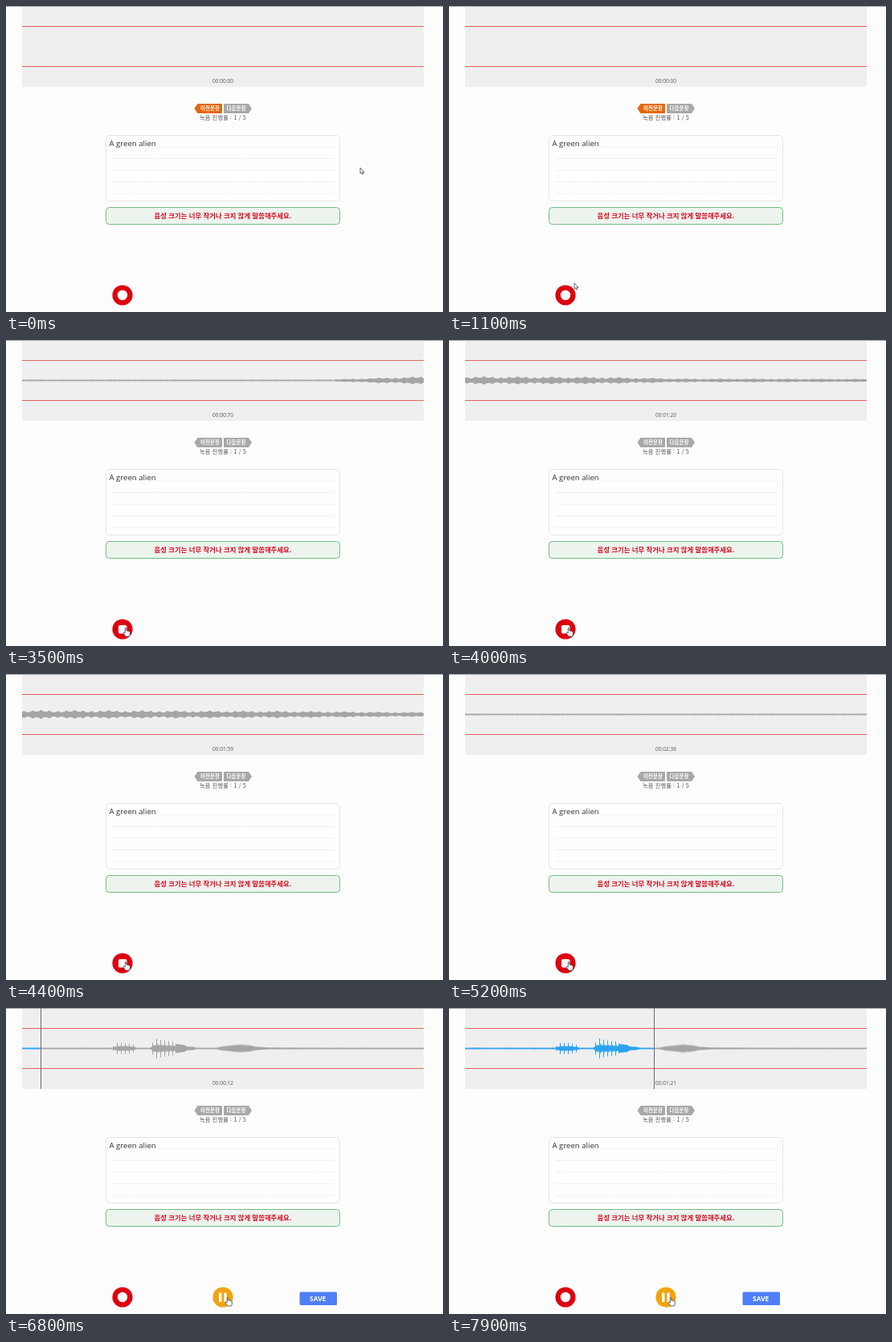
Animation, 544 px wide and 382 px high, one loop 8 s. Source, as an HTML page:

```html
<!DOCTYPE html>
<html lang="ko">
<head>
<meta charset="utf-8">
<title>Recorder</title>
<style>
  html, body { margin: 0; width: 100%; height: 100%; overflow: hidden; background: #fefdfe; }
  svg { display: block; width: 544px; height: 382px; }
  text { font-family: "Open Sans", "Noto Sans CJK KR", "Noto Sans CJK", sans-serif; }
  .ko { font-family: "Noto Sans CJK KR", "Noto Sans CJK", sans-serif; }
  .mid { text-anchor: middle; }
  .bold { font-weight: 700; }
  .white { fill: #fff; }
</style>
</head>
<body>
<svg viewBox="0 0 544 382">
  <rect x="20" width="500" height="101" fill="#f0eff0"/>
  <rect width="544" height="1" fill="#a3a2a4"/>
  <path d="M20 25.5H520M20 75.5H520" stroke="#e4605f"/>
  <path id="rest" stroke="#a6a5a6"/>
  <path id="done" stroke="#2ba4ee"/>
  <path id="head" d="M.5 0V101" stroke="#6d6c6e"/>
  <text id="clock" x="257" y="96" font-size="6.55" fill="#555"></text>

  <path id="prev" d="M234.5 128L238.5 122H268Q269 122 269 123V133Q269 134 268 134H238.5Z"/>
  <path d="M306 128L302 122H272Q271 122 271 123V133Q271 134 272 134H302Z" fill="#a9a8a9"/>
  <text class="ko bold white mid" x="254" y="130.4" font-size="6.5">이전문장</text>
  <text class="ko bold white mid" x="286.5" y="130.4" font-size="6.5">다음문장</text>
  <text class="ko mid" x="270" y="142" font-size="7.2" letter-spacing=".15" fill="#555">녹음 진행률 : 1 / 5</text>

  <rect x="124.5" y="161.5" width="291" height="82" rx="5" fill="#fefefe" stroke="#e1e5e5"/>
  <path d="M188 176H409M133 190.5H409M133 205H409M133 219.5H409M133 234H409" stroke="#dcdcde" stroke-width=".8" stroke-dasharray="1 1"/>
  <text x="128.5" y="174.8" font-size="9.6" fill="#333">A green alien</text>

  <rect x="124.5" y="251.5" width="291" height="21" rx="4" fill="#edf4ee" stroke="#74bc82"/>
  <text class="ko bold mid" x="270" y="265" font-size="8.4" fill="#d8071f">음성 크기는 너무 작거나 크지 않게 말씀해주세요.</text>

  <circle cx="145" cy="361" r="12.6" fill="#dc0210"/>
  <rect id="dot" fill="#fff"/>
  <g id="tools">
    <circle cx="270" cy="361" r="12.6" fill="#f2a20d"/>
    <path id="play" class="white"/>
    <rect x="365.5" y="354.5" width="46.5" height="16.5" rx="1.5" fill="#4f7ef6"/>
    <text class="bold white mid" x="388.2" y="365.8" font-size="8.4">SAVE</text>
  </g>
  <path id="cursor" fill="#fff" stroke="#444" stroke-width=".8" stroke-linejoin="round"/>
</svg>
<script>
const LOOP = 8000, STEP = 100;
const REC = 2700, STOP = 5400, PLAY = 6600;
const LEFT = 20, WIDTH = 500, MID = 50.5, SPEED = 195; // px per second of sound

const ARROW = "M0 0V7.2L1.6 5.8L2.7 8.2L3.8 7.7L2.7 5.4H4.9Z";
const HAND = "M-.8 .8Q0-.4.8.8V4Q2 3.3 2.6 4.4Q4 3.8 4.3 5Q5.4 4.8 5.4 6V8Q5.4 9.4 4.4 11H-.2L-2.8 7.2Q-3.2 5.8-1.8 6.2L-.8 7Z";

// loudness along the 500 px of recorded sound
const LOUD = [[0, 0], [111, .2], [113, 2.4], [118, 6.5], [130, 6.5], [139, 4], [143, .3],
  [159, .3], [162, 7], [167, 12], [173, 10], [188, 8], [192, 4.8], [201, 4], [205, 1.8],
  [212, 1.6], [218, .2], [240, .3], [248, 2.2], [270, 5], [282, 4], [290, 2], [305, .8],
  [380, .3], [500, .1]];
const CURSOR_X = [[100, 441], [600, 156], [2200, 156], [2500, 149], [5600, 149], [6300, 276]];
const CURSOR_Y = [[100, 202], [600, 346], [2200, 346], [2500, 359], [5600, 359], [6300, 361]];

const el = Object.fromEntries([...document.querySelectorAll("[id]")].map(e => [e.id, e]));
const set = (e, attrs) => Object.entries(attrs).forEach(([k, v]) => e.setAttribute(k, v));

function track(keys, t, ease = u => u) {
  const i = keys.findIndex(k => k[0] > t);
  if (i < 0) return keys[keys.length - 1][1];
  if (i === 0) return keys[0][1];
  const [t0, a] = keys[i - 1], [t1, b] = keys[i];
  return a + (b - a) * ease((t - t0) / (t1 - t0));
}
const smooth = u => u * u * (3 - 2 * u);
const noise = n => { const s = Math.sin(n * 91.7) * 4375.5; return s - Math.floor(s); };

// whole recording: sharp pulses in the vowels, a dense spindle at the end
function fullWave(p) {
  let shape = 1;
  if (p < 191) shape = [.4, .3, 1, .45, .3][(p + (p < 150 ? 4 : 0)) % 5];
  else if (p > 240) shape = p % 2 ? 1 : .7;
  return track(LOUD, p) * shape;
}

// short window of live sound with its pitch visible
function liveWave(p, sec) {
  const loud = track(LOUD, SPEED * (sec - .2 + .093 * p / WIDTH));
  const pitch = .42 + .33 * Math.cos((p - 23) * .299) ** 4 + .25 * Math.cos((p - 23) * .0748) ** 2;
  return loud * pitch;
}

function bars(from, to, wave) {
  let d = "";
  for (let x = from; x < to; x++) {
    const p = x - LEFT, h = .85 + .3 * noise(p) ** 4 + Math.max(0, wave(p) - .4);
    d += `M${x + .5} ${(MID - h).toFixed(2)}V${(MID + h).toFixed(2)}`;
  }
  return d;
}

function centis(t) {
  if (t < STOP) return t < 4000 ? Math.max(0, (t - 2800) / 10) : 120 + (t - 4000) * .0967;
  return t < PLAY ? 256 : Math.max(0, (t - 6680) * .0992);
}

function draw(t) {
  const recording = t >= REC && t < STOP, stopped = t >= STOP, playing = t >= PLAY;
  const cs = centis(t), two = n => String(n).padStart(2, "0"), c = Math.round(cs);
  el.clock.textContent = `00:${two(Math.floor(c / 100))}:${two(c % 100)}`;

  const head = playing ? Math.floor(LEFT + SPEED * cs / 100) : LEFT;
  const wave = stopped ? fullWave : p => liveWave(p, cs / 100);
  set(el.rest, { d: t < REC ? "" : bars(head, LEFT + WIDTH, wave) });
  set(el.done, { d: bars(LEFT, head, wave) });
  set(el.head, { transform: `translate(${head})`, visibility: stopped ? "visible" : "hidden" });

  set(el.prev, { fill: t < REC ? "#e66708" : "#a9a8a9" });
  set(el.dot, recording
    ? { x: 140, y: 356, width: 10.5, height: 10.5, rx: 2 }
    : { x: 138.8, y: 354.8, width: 12.4, height: 12.4, rx: 6.2 });
  set(el.tools, { visibility: stopped ? "visible" : "hidden" });
  set(el.play, { d: playing ? "M265 355.5h3.4v11.5h-3.4zM271.4 355.5h3.4v11.5h-3.4z" : "M266.5 355L276 361L266.5 367Z" });

  const x = track(CURSOR_X, t, smooth), y = track(CURSOR_Y, t, smooth);
  const over = cx => Math.hypot(x - cx, y - 361) < 12.6;
  set(el.cursor, { d: over(145) || stopped && over(270) ? HAND : ARROW, transform: `translate(${x} ${y})` });
}

let last = -1;
function tick() {
  const t = Math.floor(performance.now() % LOOP / STEP) * STEP;
  if (t !== last) draw(last = t);
  requestAnimationFrame(tick);
}
tick();
</script>
</body>
</html>
```
